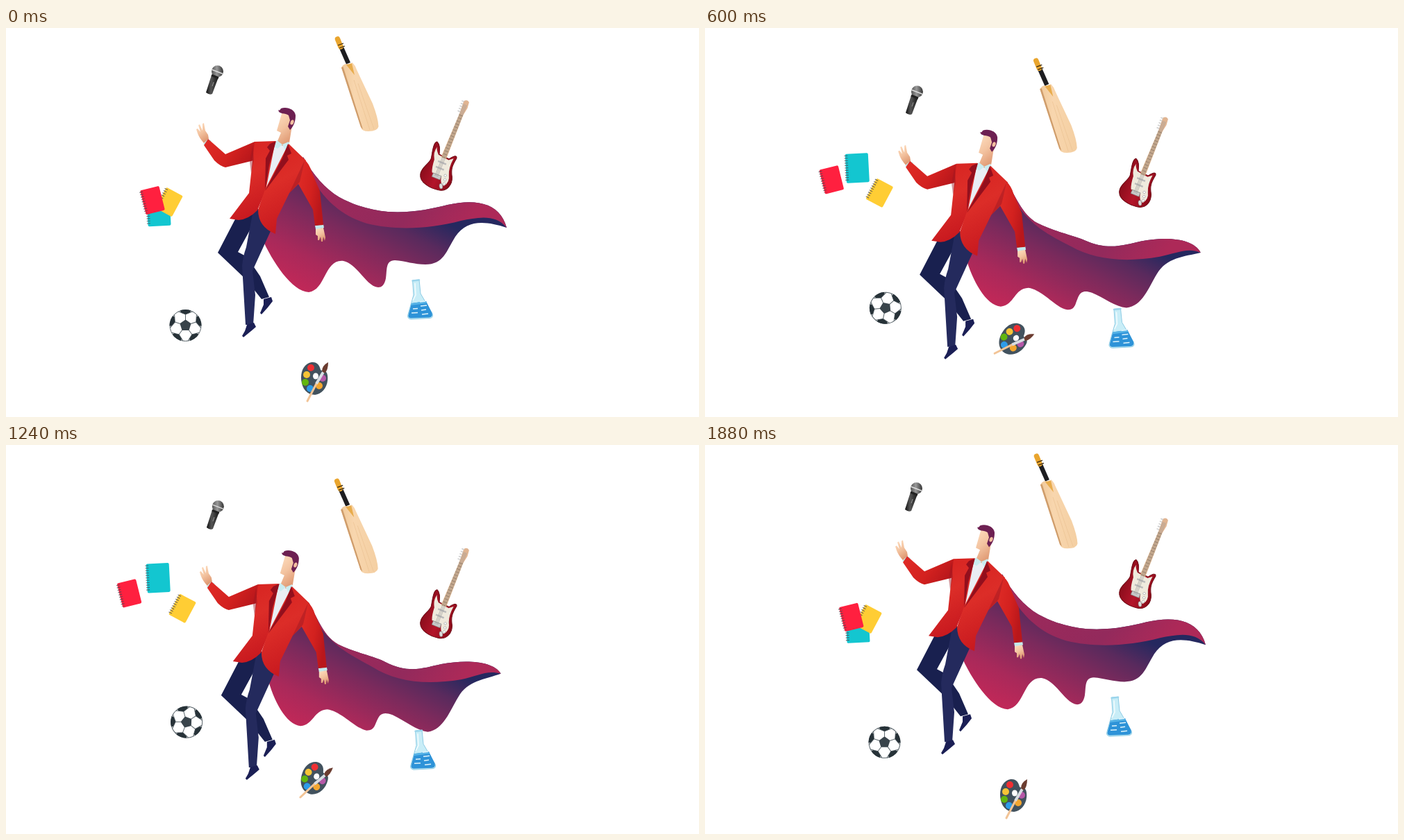
An HTML page for the animation above (1920 ms loop, 998 by 561 pixels).

```html
<!DOCTYPE html>
<html lang="en">
<head>
<meta charset="utf-8">
<title>Flying hero</title>
<style>
html, body { margin: 0; width: 100%; height: 100%; overflow: hidden; background: #fff; }
svg { display: block; }
</style>
</head>
<body>
<svg width="998" height="561" viewBox="0 0 998 561">
  <defs>
    <linearGradient id="lining" x1=".15" y1=".95" x2=".75" y2=".3">
      <stop stop-color="#bf2858"/><stop offset=".2" stop-color="#a9295a"/><stop offset=".48" stop-color="#7b2a5c"/>
      <stop offset=".66" stop-color="#592a5d"/><stop offset=".85" stop-color="#25285f"/>
    </linearGradient>
    <linearGradient id="outer" x1="0" y1="0" x2="1" y2=".3">
      <stop stop-color="#a92a59"/><stop offset=".3" stop-color="#9a295b"/><stop offset=".7" stop-color="#932a5c"/><stop offset="1" stop-color="#ad2958"/>
    </linearGradient>
    <linearGradient id="coat" x1="0" y1="0" x2=".3" y2="1">
      <stop stop-color="#d6211f"/><stop offset=".5" stop-color="#dc2d28"/><stop offset="1" stop-color="#c8191f"/>
    </linearGradient>
    <linearGradient id="sleeve" x1="0" y1="0" x2="1" y2=".4">
      <stop stop-color="#e02c27"/><stop offset=".6" stop-color="#d3211f"/><stop offset="1" stop-color="#b9171b"/>
    </linearGradient>
    <linearGradient id="skin" x1="0" y1="0" x2=".4" y2="1">
      <stop stop-color="#ffe0c2"/><stop offset=".55" stop-color="#f3c3a0"/><stop offset="1" stop-color="#e09a74"/>
    </linearGradient>
    <linearGradient id="wood"><stop stop-color="#f0c99a"/><stop offset=".35" stop-color="#f8d6ae"/><stop offset="1" stop-color="#f4cfa2"/></linearGradient>
    <linearGradient id="metal"><stop stop-color="#555"/><stop offset=".45" stop-color="#999"/><stop offset="1" stop-color="#333"/></linearGradient>
    <linearGradient id="body"><stop stop-color="#111"/><stop offset=".4" stop-color="#555"/><stop offset="1" stop-color="#181818"/></linearGradient>
    <linearGradient id="red"><stop stop-color="#8c0d1c"/><stop offset=".5" stop-color="#b3152a"/><stop offset="1" stop-color="#8a0b19"/></linearGradient>
    <clipPath id="disc"><circle r="23"/></clipPath>
  </defs>

  <path id="cape" fill="url(#lining)"/>
  <path id="band" fill="url(#outer)"/>

  <g id="man">
    <path fill="#19204f" d="M333 270L364 262 352 290 334 323 347 330 366 358 379 388 368 391 345 362 305 324Z"/>
    <path fill="#1b1f55" d="M371 391L382 388 384 394 377 403 368 413 366 411 371 399Z"/>
    <path fill="#242a5d" d="M361 260L386 275 381 293 355 350 359 385 356 428 345 428 340 343Q341 330 346 316L355 268Z"/>
    <path fill="#1b1f55" d="M347 428L357 425 360 431 353 437 342 446 340 444 344 437Z"/>
    <path fill="url(#skin)" d="M285 166Q278 158 276 152L274 146 276 145 280 150 277 140 279 139 283 148 283 138 285 137 287 148 291 154 292 160Z"/>
    <path fill="url(#skin)" d="M446 289L457 288 460 302 459 307 457 301 456 308 454 308 453 301 451 306 449 306 449 300 446 298Z"/>
    <path fill="#c3e9ec" d="M284 167L291 160 296 163 289 171ZM445 285L457 283 458 288 446 290Z"/>
    <path fill="#e9eef4" d="M390 163L407 165 402 186 373 235 376 196Z"/>
    <path fill="url(#skin)" d="M398 120L390 148 396 151 391 163 398 170 408 165 411 147 414 134 408 124Z"/>
    <path fill="#c9ecf0" d="M390 162L398 168 391 174 386 171ZM398 168L407 164 409 170 402 176Z"/>
    <path fill="#6d2052" d="M392 118Q394 120 396 116C404 113 416 117 417 126C417 134 415 141 409 147L406 142 409 133 407 126C402 122 393 125 392 118Z"/>
    <ellipse cx="412" cy="136" rx="2.4" ry="3.6" fill="#f3bfa0" transform="rotate(20 412 136)"/>
    <path fill="url(#sleeve)" d="M291 160L316 182 358 164 361 190 316 201Q308 199 300 191L285 169Z"/>
    <path fill="url(#coat)" d="M358 164L388 163 374 234 362 263Q349 276 335 277L322 275 350 238Z"/>
    <path fill="url(#coat)" d="M407 167L432 191 424 222 408 238 390 275 388 297Q363 287 363 262L373 233Z"/>
    <path fill="url(#sleeve)" d="M430 190Q437 196 440 207L452 235 457 284 445 285 442 262 421 225Z"/>
    <path fill="#930f1d" d="M389 163L380 167 376 172 380 177 374 188 373 234 379 198ZM406 167L411 181 405 184 407 190 373 235 398 188Z"/>
    <path fill="#9b1722" opacity=".45" d="M355 169L357 190 353 209 351 193ZM430 191L423 222 408 238Z"/>
  </g>

  <g id="bat">
    <path stroke="#1d1d20" stroke-width="6.500" d="M482 26L493 51"/>
    <path stroke="#e9a52e" stroke-width="7.500" stroke-linecap="round" d="M477.500 16L482 27"/>
    <path stroke="#3a2a12" stroke-width="1.300" d="M478 25L486 22M480 29L488 26"/>
    <path fill="url(#wood)" d="M483 57Q486 51 493 52L499 50Q503 54 505 60L528 109Q536 130 536.500 142 535 149 522 149 512 149 511 143Z"/>
    <path fill="#cf9d6c" d="M483 57L485.500 56 514 146 511 143Z"/>
    <path fill="#e8ac4c" d="M490 53L498 51 502 68Z"/>
    <path stroke="#ecc496" fill="none" stroke-width=".8" d="M501 75L524 147M507 80L530 146"/>
  </g>

  <g id="mic">
    <path fill="url(#body)" d="M296 68L306 71 297 95Q293 97 288 93Z"/>
    <circle cx="304.500" cy="62.500" r="8.500" fill="url(#metal)"/>
    <path d="M296.500 60L312 66" stroke="#ddd" stroke-width="1.500"/>
    <path d="M296 68L306 72" stroke="#222" stroke-width="3"/>
    <path d="M299 78L297 84" stroke="#999"/>
  </g>

  <g id="guitar"><g transform="translate(624 203) rotate(22) scale(.97)">
    <path fill="url(#red)" stroke="#6d0813" d="M-8-20C-10-26-12-34-18-36C-23-34-19-20-17-10C-16-2-26 8-23 18C-20 30-2 32 10 30C24 28 27 14 22 4C16-6 16-12 18-24C17-30 11-24 8-19Z"/>
    <path fill="#efeadd" d="M-9-19Q-15-25-15-29-18-20-12-10-11 3-8 9L7 10Q10 22 16 21 22 13 17 4 12-6 14-22L8-17Z"/>
    <path fill="#d5ad87" d="M-3-88L3-88 4-17-4-17Z"/>
    <path fill="#e0b491" d="M-3-87L-4-107Q0-112 4-108L5-99 3-87Z"/>
    <path stroke="#8a6a50" stroke-width="6" stroke-dasharray=".8 4" d="M0-86V-18"/>
    <path stroke="#ccc" stroke-width="4" stroke-dasharray="1.500 2.500" d="M-5-107V-89"/>
    <path stroke="#bbb" stroke-width="2.500" d="M-6-10H7M-6-1H7"/>
    <path fill="#c9c9c9" stroke="#777" stroke-width=".6" d="M-6 9H7V15H-6Z"/>
    <path stroke="#999" stroke-width=".6" d="M-2-103V12M0-103V12M2-103V12"/>
    <g fill="#fff" stroke="#999" stroke-width=".6"><circle cx="12" cy="6" r="1.800"/><circle cx="14" cy="12" r="1.800"/><circle cx="15" cy="18" r="1.800"/></g>
    <ellipse cx="12" cy="23" rx="4" ry="2.500" fill="#ddd" stroke="#777" stroke-width=".6" transform="rotate(60 12 23)"/>
  </g></g>

  <g id="teal"></g><g id="yellow"></g><g id="crimson"></g>
  <g id="ball"></g>

  <g id="flask">
    <path fill="#c8edf7" stroke="#8dcbe4" d="M585.500 364L595 363 597 383 614 412Q616 418 610 418.500L583 420Q577 419 579 413L587 385Z"/>
    <path fill="#2e93d8" d="M584 397L605 394 613.500 411Q615 417 609 417.500L583 418.500Q578 418 580 412Z"/>
    <path fill="#56b3e6" d="M584 397L605 394 606 397 583 400Z"/>
    <path stroke="#dff4fb" stroke-width="1.700" d="M596 395L604 394M597 401L606 400M598 407L605 406M599 413L608 412M586 405L593 404.500M584 411L593 410.500"/>
    <path stroke="#9bd5ec" stroke-width="2.500" stroke-linecap="round" d="M585.500 364.500L595 363.500"/>
    <path fill="none" stroke="#fff" stroke-width="1.500" opacity=".8" d="M589 368L590 385 586 393"/>
  </g>

  <g id="palette">
    <path fill="#42525e" d="M-4-24C5-25 8-18 9-13C12-10 18-14 19-5C21 10 12 22 1 23C-12 23-19 12-19-2C-19-13-14-22-4-24Z"/>
    <g id="dots"></g>
    <ellipse cx="2" cy="-4" rx="4" ry="4.500" fill="#fff"/>
    <path stroke="#f2c496" stroke-width="3" stroke-linecap="round" d="M-10 32L4 5"/>
    <path stroke="#d7dde2" stroke-width="4" d="M3 7L13-10"/>
    <path fill="#6b3c30" d="M11-11Q11-19 20-24Q20-13 15-8Z"/>
  </g>
</svg>
<script>
const LOOP = 1920, STEP = 40;
const $ = id => document.getElementById(id);

function notebook(id, w, h, color) {
  $(id).innerHTML = `<rect x="${-w / 2}" y="${-h / 2}" width="${w}" height="${h}" rx="2" fill="${color}"/>
    <path d="M${-w / 2 + 1} ${-h / 2 + 2}V${h / 2 - 2}" stroke="#4b4550" stroke-width="5" stroke-dasharray="1.200 2.300" opacity=".75"/>`;
}
notebook('crimson', 28, 36, '#ff203f');
notebook('teal', 33, 42, '#13c6d0');
notebook('yellow', 27, 34, '#ffcd34');

const polar = (r, deg) => [r * Math.sin(deg * Math.PI / 180), -r * Math.cos(deg * Math.PI / 180)];
const fifths = [0, 72, 144, 216, 288];
const pentagon = 'M' + fifths.map(a => polar(8.5, a)).join('L') + 'Z';
$('ball').innerHTML = '<circle r="22.500" fill="#fff" stroke="#59646a"/><g clip-path="url(#disc)">' +
  `<path d="${pentagon}" fill="#39444b"/>` + fifths.map(a =>
  `<g transform="rotate(${a})"><path d="M0-8V-16L-10-20M0-16L10-20" stroke="#59646a" fill="none"/>
   <path d="M-7-19L0-16 7-19 8-24H-8Z" fill="#273238"/></g>`).join('') + '</g>';

$('dots').innerHTML = [[-5, -16, '#ef2f32'], [-11, -6, '#f6c436'], [-13, 5, '#62b60e'], [-6, 14, '#2d9be8'], [7, 10, '#f3a62f'], [12, -1, '#b558a8']]
  .map(([x, y, c]) => `<circle cx="${x}" cy="${y}" r="5" fill="${c}"/>`).join('');

// Cape outlines at the top and at the bottom of the flight, with matching segments
const edgeA = 'M428 186C442 212 460 232 480 244C502 256 525 263 550 265C585 267 612 261 636 255C680 245 712 254 721 288';
const edgeB = 'M438 236C452 262 458 285 478 296C505 309 530 312 545 322C580 343 600 333 625 328C660 322 700 323 711 338';
const capeA = edgeA + 'C690 278 664 276 647 301C634 322 630 341 604 341C588 341 575 336 560 335C546 335 549 350 547 361C545 371 541 374 536 374C519 373 507 341 486 336C458 333 461 378 436 381C412 380 384 338 368 302Z';
const capeB = edgeB + 'C690 350 665 352 652 376C640 396 630 424 608 428C592 426 575 410 556 400C536 391 534 402 529 411C526 418 522 419 516 419C500 416 478 392 458 390C440 392 440 408 422 410C402 408 385 375 378 340Z';
const bandA = edgeA + 'C705 268 680 273 655 278C610 290 560 292 520 282C480 270 455 245 434 205Z';
const bandB = edgeB + 'C690 335 680 345 655 350C600 358 560 350 530 328C495 306 470 300 440 250Z';

function morph(a, b, k) {
  const ends = b.match(/\d+/g);
  let i = 0;
  return a.replace(/\d+/g, n => (+n + (ends[i++] - n) * k).toFixed(2));
}

const wave = t => (1 - Math.cos(2 * Math.PI * t / LOOP)) / 2;

// Smooth curve through [time, value] knots
function spline(knots, t) {
  const i = Math.max(0, knots.findIndex(k => k[0] > t) - 1);
  const [a, b] = [knots[i], knots[i + 1]], d = b[0] - a[0], u = (t - a[0]) / d;
  const slope = j => {
    const p = knots[j - 1], q = knots[j + 1];
    return p && q ? (q[1] - p[1]) / (q[0] - p[0]) * d : 0;
  };
  return a[1] + (b[1] - a[1]) * u * u * (3 - 2 * u) + u * (1 - u) * ((1 - u) * slope(i) - u * slope(i + 1));
}
const micDrop = [[0, 0], [240, 20], [455, 38], [700, 20], [945, 0], [1165, 19], [1400, 38], [1560, 28], [1880, 0], [1920, 0]];
const paletteRise = [[0, 0], [440, 49], [610, 57], [760, 55], [1080, 32], [1400, 19], [1560, 13], [1880, 0], [1920, 0]];
const paletteTurn = [[0, 0], [440, 31], [610, 36], [760, 35], [1080, 26], [1400, 12.4], [1560, 6.5], [1880, 0], [1920, 0]];

const place = (id, x, y, turn = 0) => $(id).setAttribute('transform', `translate(${x} ${y}) rotate(${turn})`);

function draw(now) {
  const t = Math.floor(now % LOOP / STEP) * STEP, s = wave(t), k = s / .962;
  $('cape').setAttribute('d', morph(capeA, capeB, k));
  $('band').setAttribute('d', morph(bandA, bandB, k));
  place('man', 6 * s, 46 * s);
  place('bat', -s, 45 * s);
  place('guitar', 0, 50 * wave(t - 110) - 1.6);
  place('flask', 5 * s, 60 * s);
  place('ball', 258.5 + 2 * s, 429 - 36.5 * s, 70 * s);
  place('crimson', 211 - 41.5 * s, 248.5 - 43 * s, -14);
  place('teal', 220 - s, 264.5 - 90.5 * s, -3);
  place('yellow', 235 + 23.7 * s, 251 - 19 * s, 28);
  const drop = spline(micDrop, t);
  place('mic', drop / 30, drop);
  place('palette', 444, 506 - spline(paletteRise, t), spline(paletteTurn, t));
}

const start = performance.now();
function tick() {
  draw(performance.now() - start);
  requestAnimationFrame(tick);
}
tick();
</script>
</body>
</html>
```
